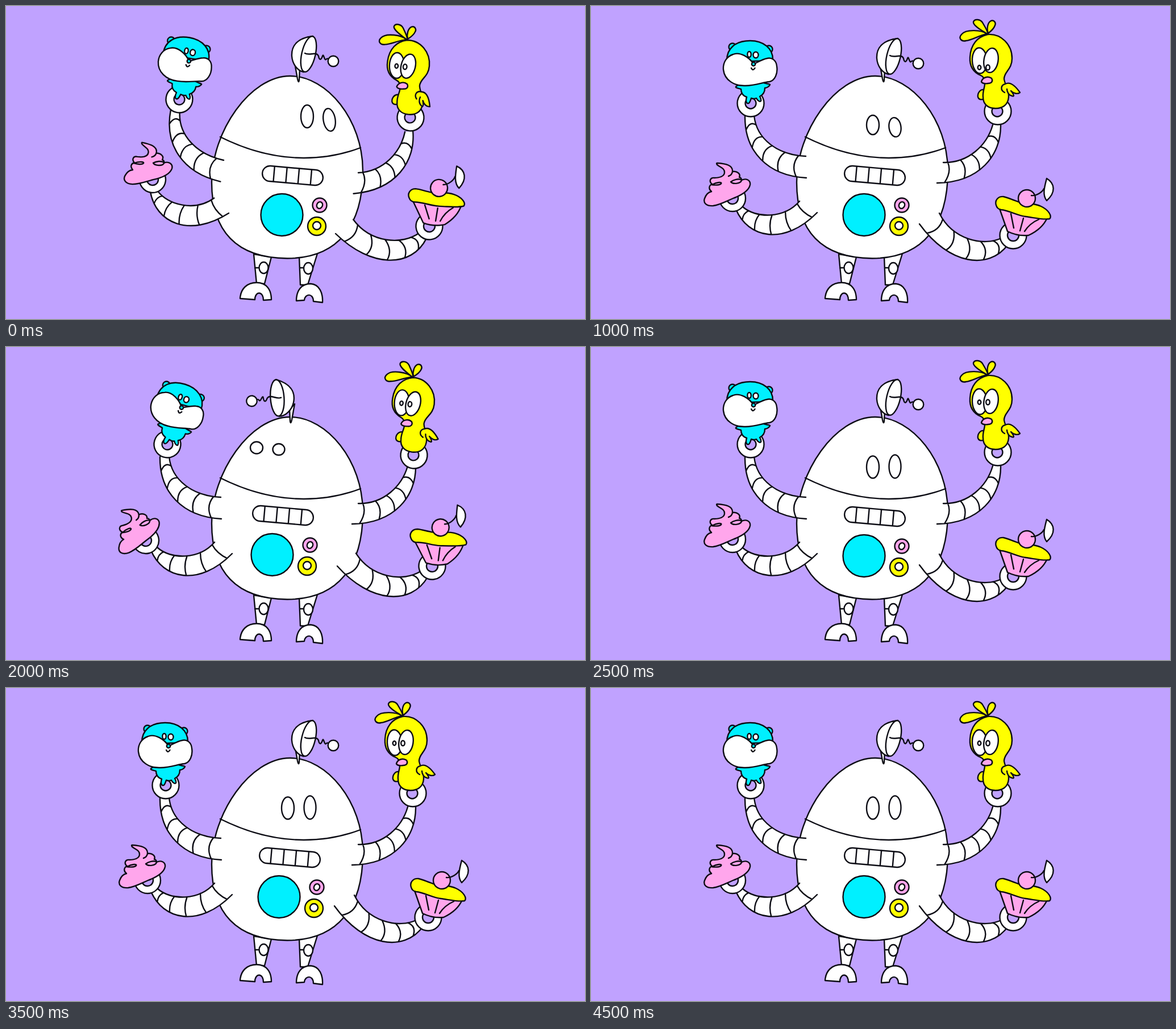
An HTML page for the animation above (5000 ms loop, 1019 px wide and 550 px high).

```html
<!DOCTYPE html>
<html lang="en">
<head>
<meta charset="utf-8">
<title>Robot juggling treats</title>
<style>
  html, body { margin: 0; width: 100%; height: 100%; overflow: hidden; background: #c0a2ff; }
  svg { display: block; width: 1019px; height: 550px; }
  svg { fill: #fff; stroke: #0c0c14; stroke-width: 2.4; stroke-linecap: round; stroke-linejoin: round; }
  .line { fill: none; }
  .bare { stroke: none; }
  .cyan { fill: #00f0ff; }
  .pink { fill: #ffa6ec; }
  .yellow { fill: #ffff00; }
  .hole { fill: #c0a2ff; }
</style>
</head>
<body>
<svg viewBox="0 0 1019 550">
  <g id="legs">
    <path d="M436 436L441 488H455L467 441Z"/>
    <path d="M516 440L518 490H531L548 435Z"/>
    <path d="M438 460H446M518 460H525" class="line"/>
    <ellipse cx="453.500" cy="460" rx="8" ry="10"/>
    <ellipse cx="532" cy="461" rx="8" ry="10"/>
    <path d="M412 514C413 496 425 486 441 486C458 486 467 498 467 516L453 517C453 500 438 501 438 516Z"/>
    <path d="M511 518C511 500 520 488 536 488C552 489 558 505 557 521L541 519C541 504 526 505 525 517Z"/>
  </g>

  <path d="M500 123C565 123 628 200 628 290C628 385 585 443 495 443.500C405 443 362 395 362 310C362 220 430 123 500 123Z"/>
  <path class="line" d="M377 230C425 254 475 267 524 267C560 267 595 260 624 249"/>

  <g id="antenna">
    <path d="M508 100L513 128Q515 137 516 130L517 110Z"/>
    <g id="dish">
      <path d="M540 57C515 60 502 72 503 92C504 106 513 118 524 120Z"/>
      <ellipse cx="532.500" cy="88.500" rx="12" ry="32" transform="rotate(13 532.500 88.500)"/>
      <path class="line" d="M526 87C534 92 546 83 550 92C551 98 554 101 557 92C559 86 560 100 563 98Q566 95 568 98"/>
      <circle cx="576" cy="101" r="9.300"/>
    </g>
  </g>

  <ellipse id="eyeL"/>
  <ellipse id="eyeR"/>

  <g id="chest">
    <g transform="translate(499.500 298) rotate(5)">
      <rect x="-53.500" y="-13.500" width="107" height="27" rx="13.500"/>
      <path class="line" d="M-33-13V13M-11-13V13M10.500-13V13M32.500-13V13"/>
    </g>
    <circle class="cyan" cx="480.500" cy="367" r="37"/>
    <circle class="pink" cx="547" cy="350" r="12.500"/>
    <ellipse cx="547" cy="350" rx="5" ry="6" transform="rotate(25 547 350)"/>
    <circle class="yellow" cx="542" cy="387" r="16"/>
    <circle cx="542" cy="386" r="7"/>
  </g>

  <g id="armUL"></g>
  <g id="armLL"></g>
  <g id="armUR"></g>
  <g id="armLR"></g>

  <g id="hamster">
    <circle cx="281" cy="171" r="23.500"/>
    <circle class="hole" cx="281" cy="171" r="9.500"/>
    <path class="cyan" d="M266 137C258 139 254 141 255 143C258 145 262 145 264 146C264 154 268 158 274 160C272 166 273 172 277 171C280 170 281 164 282 162C285 163 289 163 291 162C293 166 297 169 299 167C300 163 298 161 297 159C303 156 306 151 306 144C310 144 314 141 315 138C312 136 306 137 302 134Z"/>
    <circle class="cyan" cx="249" cy="72" r="6.500"/>
    <circle class="cyan" cx="313" cy="76" r="6.500"/>
    <path class="cyan" d="M239 98C238 74 255 61 280 61C303 61 321 74 320 96Z"/>
    <path d="M286 102C279 90 262 80 250 85C238 89 232 100 233 112C235 130 252 141 272 140C290 140 302 134 314 133C324 131 329 118 327 106C326 95 318 90 310 92C300 94 292 100 286 102Z"/>
    <ellipse cx="278.500" cy="85" rx="3.200" ry="5"/>
    <ellipse cx="290" cy="86" rx="4.500" ry="5.300"/>
    <circle class="cyan" cx="286" cy="102" r="3.200"/>
    <path class="line" d="M282 109Q285 115 288.500 109"/>
  </g>

  <g id="swirl">
    <circle cx="249" cy="338" r="23"/>
    <circle class="hole" cx="249" cy="338" r="10"/>
    <path class="pink" d="M222 276C238 277 250 280 249 291C256 290 264 294 261 301Q265 302 265 306C273 302 281 306 280 314C278 324 266 332 250 338C238 343 228 349 215 351C203 352 197 346 200 338C203 330 207 327 212 326C206 321 208 315 213 313C207 308 210 301 217 302C225 302 235 300 235 292C235 285 228 284 222 279Q220 276 222 276Z"/>
    <path class="line" d="M213 314C222 309 231 309 229 312C227 315 218 315 212 314M246 309C250 314 264 312 265 306C260 302 250 306 246 309M242 299Q248 297 249 291"/>
  </g>

  <g id="bird">
    <circle cx="716" cy="185" r="23.500"/>
    <circle class="hole" cx="715" cy="185" r="9.500"/>
    <g class="yellow">
      <path d="M697 49C688 42 660 40 652 50C646 57 652 63 660 61C670 60 682 52 697 49Z"/>
      <path d="M697 49C690 44 672 35 673 28C675 22 685 23 689 29C693 36 697 42 698 47Z"/>
      <path d="M699 48C696 40 698 29 704 26C710 24 713 30 711 34C709 40 703 45 699 48Z"/>
      <path d="M692 147C684 146 680 154 681 160C683 166 690 165 693 162Z"/>
      <path d="M698 50C722 48 741 68 741 92C741 112 727 115 727 128C728 138 736 146 735 160C734 174 724 180 712 180C698 180 690 172 690 160C689 148 694 142 693 134C692 126 690 124 686 122C672 116 666 105 667 90C668 68 680 54 698 50Z"/>
      <path id="wing" d="M728 152C720 148 721 139 729 137C738 132 748 142 755 152C750 156 743 153 739 149C744 155 746 160 741 158C735 157 732 150 732 146"/>
    </g>
    <ellipse cx="684" cy="96" rx="13" ry="22.500" transform="rotate(-3 684 96)"/>
    <ellipse cx="704" cy="95.500" rx="12.500" ry="21.500" transform="rotate(9 704 95.500)"/>
    <g id="pupils">
      <ellipse cx="683.500" cy="97" rx="2.800" ry="3.700"/>
      <ellipse cx="698.500" cy="97" rx="3.300" ry="4.500"/>
    </g>
    <path class="pink" d="M687 133C689 126 698 122 705 127C708 132 705 136 699 136C694 137 688 136 687 133Z"/>
  </g>

  <g id="cupcake">
    <circle cx="743" cy="403" r="23.500"/>
    <circle class="hole" cx="743" cy="403" r="10"/>
    <path class="pink" d="M719 356L733 396C745 402 759 404 770 403C785 396 797 386 803 372Z"/>
    <path class="line" d="M739 365L744 390M761 373L755 395M788 375Q772 382 763 396"/>
    <path class="yellow" d="M713 350C710 341 717 334 726 335C735 337 742 341 752 344C765 347 780 346 792 352C805 358 812 369 807 374C795 376 780 372 765 370C750 368 735 359 722 358C716 357 714 354 713 350Z"/>
    <circle class="pink" cx="767" cy="338" r="15"/>
    <path class="line" d="M775 333C785 334 795 326 797 321"/>
    <path d="M802 303C817 312 818 328 802 342C794 332 798 318 802 303Z"/>
  </g>
</svg>

<script>
const STEP = 500;
const el = id => document.getElementById(id);

// Each arm edge is a cubic running from wrist to shoulder.
function at(c, t) {
  const u = 1 - t, w = [u * u * u, 3 * u * u * t, 3 * u * t * t, t * t * t];
  return [0, 1].map(k => w.reduce((sum, wi, i) => sum + wi * c[2 * i + k], 0));
}

function drawArm(id, inner, outer, stops, bulge = 6) {
  const edge = c => `M${c[0]} ${c[1]}C${c.slice(2).join(' ')}`;
  const back = `L${outer.slice(6).join(' ')}C${[4, 2, 0].map(i => outer[i] + ' ' + outer[i + 1]).join(' ')}Z`;
  const rings = stops.map(t => {
    const a = at(inner, t), b = at(outer, t), c = at(inner, t - 0.05), d = at(outer, t - 0.05);
    const dx = c[0] + d[0] - a[0] - b[0], dy = c[1] + d[1] - a[1] - b[1];
    const k = 2 * bulge / Math.hypot(dx, dy);
    return `M${a}Q${(a[0] + b[0]) / 2 + dx * k},${(a[1] + b[1]) / 2 + dy * k} ${b}`;
  });
  el(id).innerHTML = `<path class="bare" d="${edge(inner)}${back}"/>` +
    `<path class="line" d="${edge(inner)}${edge(outer)}${rings.join('')}"/>`;
}

drawArm('armUL', [287, 192, 291, 235, 330, 262, 378, 264], [271, 193, 270, 255, 310, 298, 379, 302], [.14, .34, .53, .73, .91]);
drawArm('armLL', [266, 352, 290, 374, 340, 374, 367, 343], [255, 357, 276, 408, 340, 422, 398, 363], [.14, .33, .53, .74, .95], 3);
drawArm('armUR', [707, 209, 697, 244, 665, 276, 620, 275], [721, 209, 722, 262, 684, 310, 609, 311], [.2, .4, .58, .76, .94], 5);
drawArm('armLR', [724, 407, 690, 424, 636, 410, 613, 364], [734, 419, 700, 465, 630, 455, 578, 383], [.15, .33, .52, .72, .92]);

// Pivot, order of poses, and each pose as [dx, dy, turn]; pose c is at rest.
const ARM = 'abcccccccc', HAND = 'abccdcwcwc';
const parts = {
  armUL: [[378, 264], ARM, { a: [5, 7, 10], b: [3, -3, 3] }],
  armLL: [[398, 363], ARM, { a: [-6, 1, 13], b: [-1, -3, 3.5] }],
  armUR: [[620, 275], ARM, { a: [0, 18, -4], b: [4, 13, -7] }],
  armLR: [[578, 383], 'abccdccccc', { a: [2, 17, -10], b: [4, 4, -5], d: [5, 2, -6] }],
  hamster: [[281, 171], HAND, { a: [24, -7, 10], b: [10, -8, 4], d: [3, 0, 17], w: [2, 0, 10] }],
  swirl: [[249, 338], HAND, { a: [9, -33, 8], b: [4, -13, -1], d: [-3, 2, -15], w: [2, -1, 9] }],
  bird: [[716, 185], HAND, { a: [-4, 11, 5], b: [-9, 1, -7.6], d: [2, 5, 6.700], w: [2, 3, 6] }],
  cupcake: [[743, 403], HAND, { a: [2, -16, -6], b: [4, -11, 2], d: [7, -18, -8], w: [-1, 0, -8] }],
  wing: [[727, 142], 'abcccccccc', { a: [0, 0, 25], b: [0, 0, -8] }],
  dish: [[532, 88], 'abcmdccccc', { a: [0, -4, 0], b: [0, -6, -10], m: [4, 0, 0], d: [6, 1, -9] }],
  chest: [[0, 0], 'aacddccccc', { a: [5, 0, 0], d: [-12, -2, 0] }],
  pupils: [[0, 0], 'cbbccccccc', { b: [0, 11, 0] }]
};

// Left eye x, y, ry, then right eye x, y, ry, turn.
const eyes = {
  a: [530, 194, 20, 569, 200, 20, -9],
  b: [531, 196, 9, 569, 198, 9, 0],
  c: [496, 209, 17, 535, 213, 17, -8],
  m: [441, 177, 19, 480, 180, 19, -5],
  d: [441, 177, 10.500, 480, 180, 10, 0],
  o: [496, 211, 19.500, 535, 210, 20.500, 0]
};

function placeEye(id, x, y, rx, ry, turn) {
  const set = { cx: x, cy: y, rx, ry, transform: `rotate(${turn} ${x} ${y})` };
  for (const key in set) el(id).setAttribute(key, set[key]);
}

function pose(step) {
  for (const id in parts) {
    const [pivot, order, moves] = parts[id];
    const [dx, dy, turn] = moves[order[step]] || [0, 0, 0];
    el(id).setAttribute('transform', `translate(${dx} ${dy}) rotate(${turn} ${pivot})`);
  }
  const flipped = step === 3 || step === 4;
  el('antenna').setAttribute('transform', flipped ? 'matrix(-1 0 0 1 1016 0)' : '');
  const [x1, y1, r1, x2, y2, r2, turn] = eyes['abcmdooooo'[step]];
  placeEye('eyeL', x1, y1, 11, r1, 0);
  placeEye('eyeR', x2, y2, 10.500, r2, turn);
}

let shown = -1;
function tick() {
  const step = Math.floor(performance.now() / STEP) % 10;
  if (step !== shown) pose(shown = step);
  requestAnimationFrame(tick);
}
tick();
</script>
</body>
</html>
```
